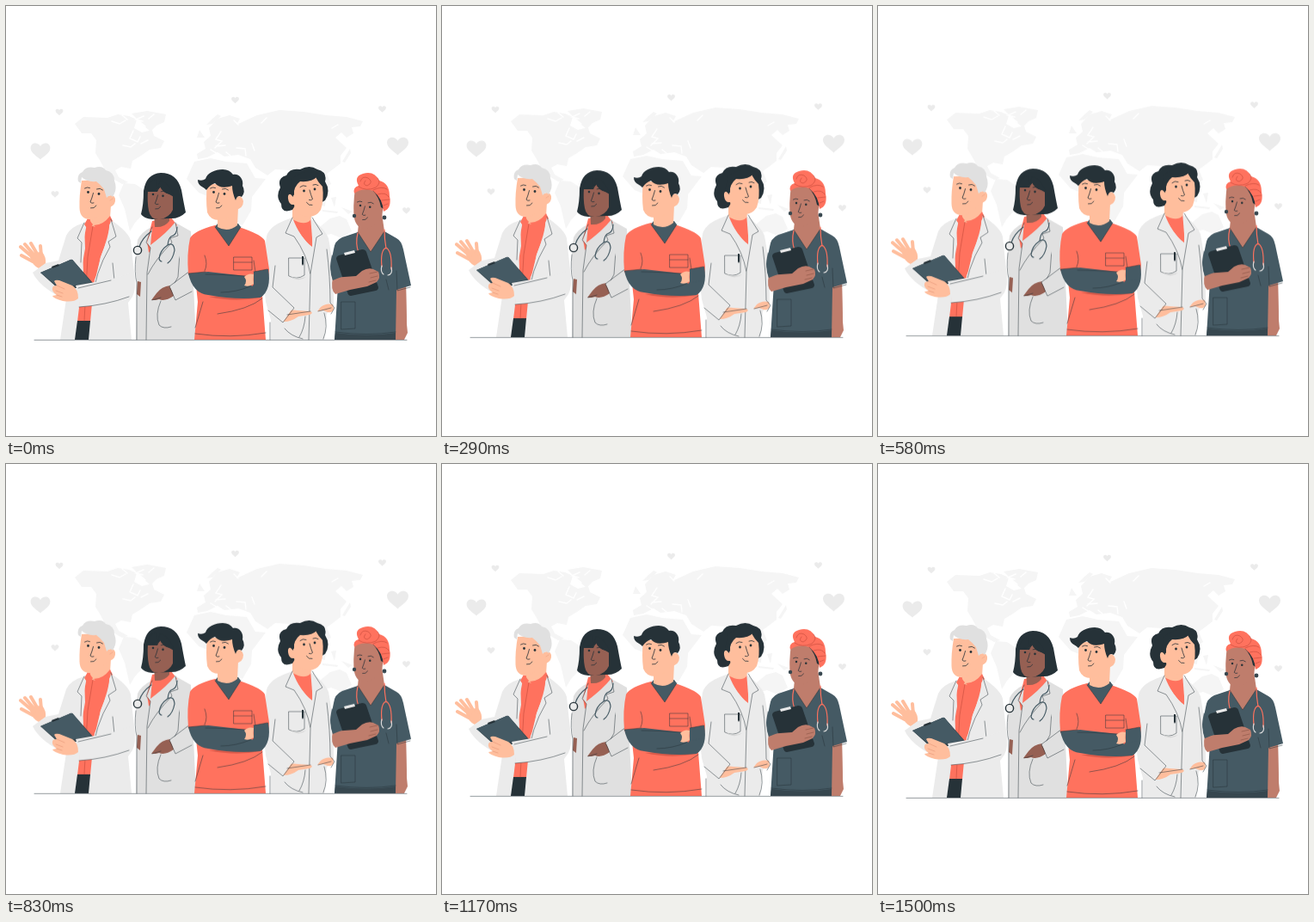
An HTML page that plays this animation: 500x500 px, repeating every 1.54 s.

```html
<!DOCTYPE html>
<html lang="en">
<head>
<meta charset="utf-8">
<title>Medical team</title>
<style>
html, body { margin: 0; width: 100%; height: 100%; overflow: hidden; background: #fff }
svg { display: block; width: 100vw; height: 100vh }
.map { fill: #f5f5f5 }
.heart { fill: #ebebeb }
.coat { fill: #ebebeb }
.coat2 { fill: #e0e0e0 }
.shade { fill: #d6d6d6 }
.grey { fill: #e0e0e0 }
.red { fill: #ff725e }
.deep { fill: #d95a4a }
.dark { fill: #263238 }
.slate { fill: #455a64 }
.navy { fill: #37474f }
.light { fill: #ffbe9d }
.brown { fill: #966053 }
.tan { fill: #bf7d6c }
.ln { fill: none; stroke: #263238; stroke-width: .5; stroke-linecap: round; stroke-linejoin: round }
.tube { fill: none; stroke: #455a64; stroke-width: 1.2; stroke-linecap: round }
.finger { fill: none; stroke: #ffbe9d; stroke-width: 4; stroke-linecap: round; stroke-linejoin: round }
.gap { fill: none; stroke: #fff; stroke-width: 1.4; stroke-linecap: round }
</style>
</head>
<body>
<svg viewBox="0 0 500 500">
<defs>
  <path id="heart" class="heart" d="M0 10C-4 6-12 2-12-4C-12-11-3-12 0-6C3-12 12-11 12-4C12 2 4 6 0 10Z"/>
  <g id="face">
    <circle r="1.4" class="dark"/><circle cx="12.5" cy="2" r="1.4" class="dark"/>
    <path class="ln" style="stroke-width:.8" d="M-4-4.500Q-1-6.500 2-5M10-3.600Q14-5.400 17-2.500M6 1Q4.500 7 2.500 11.500Q4 13.500 6.500 12.500M3 18.500Q7 19.500 9.500 15.500"/>
  </g>
</defs>
<g id="scene">

  <g class="map">
    <path d="M80 137L90 129L118 130L130 126L143 128L152 132L149 142L158 147L170 144L172 151L184 157L180 165L167 167L157 174L147 180L145 189L134 187L127 191L131 199L142 205L135 207L119 198L110 181L104 171L105 156L99 148L88 148Z"/>
    <path d="M146 125L164 122L186 126L184 135L175 139L168 146L160 139Z"/>
    <path d="M137 206L150 207L170 220L165 236L150 252L144 262L138 236L131 220Z"/>
    <path d="M222 172L232 166L230 158L238 151L236 142L246 131L260 127L272 131L268 138L292 127L318 121L346 123L372 127L396 129L415 134L412 140L402 141L404 148L396 153L390 147L383 153L396 165L389 174L389 183L380 190L373 195L378 207L371 211L361 199L348 196L342 207L330 191L313 190L304 197L290 188L284 178L270 173L254 175L246 170L234 176L223 178Z"/>
    <path d="M219 181L238 177L256 181L280 183L290 200L302 201L286 222L285 238L275 255L263 250L257 230L224 217L210 201Z"/>
    <path d="M366 256L377 247L388 244L396 248L402 262L390 270L378 265L366 268Z"/>
    <path d="M222 153L225 144L231 153ZM233 138L240 131L246 126L250 128L240 137ZM391 181L400 166L401 171L394 182ZM362 220L372 223L371 233L363 231ZM368 237L386 239L385 241L368 239ZM378 223L384 222L382 234ZM390 234L403 239L398 242Z"/>
  </g>
  <path class="gap" d="M123 134l9 3l7-4M148 145l-4 9l9 4l3-6M155 134l7 6M135 127l6 5M165 156l-8 4M160 128l-9 4l8 2M172 126l-6 5M136 162l9 2l5-4M250 146l-6 9l7 2l-8 8M265 133l5 5M244 163l11-1M238 167l8 5M256 170l5 4M268 165l10 1l1 8M286 160l3 8M303 130l-6 6M386 138l-7 4M283 186l7 13"/>

  <use href="#heart" transform="translate(40 169) scale(.95)"/>
  <use href="#heart" transform="translate(455.500 163) scale(1.040)"/>
  <use href="#heart" transform="translate(62 123.500) scale(.37)"/>
  <use href="#heart" transform="translate(266.500 109.500) scale(.37)"/>
  <use href="#heart" transform="translate(437.500 120) scale(.37)"/>
  <use href="#heart" transform="translate(57 219) scale(.37)"/>
  <use href="#heart" transform="translate(465.500 238) scale(.37)"/>

  <!-- senior doctor -->
  <g>
    <path class="light" d="M28 292Q35 285 42 286Q47 292 46 300L38 305Q30 301 28 292Z"/>
    <path class="finger" d="M32 293L17 280M33 290L22 277M36 288L29 276M41 291L40 279M31 297L18 290"/>
    <path class="coat" d="M91 252Q74 257 70 267L61 296L46 299L31 310Q38 325 62 338L70 341L63 388H146L142 345L147 338Q152 328 149 310L145 273Q143 263 121 248Z"/>
    <path class="red" d="M95 248L121 246L119 268L110 292L102 325L98 367H83L90 310L89 279Z"/>
    <path class="dark" d="M83 366H98L96 388H80Z"/>
    <path class="light" d="M96 243L122 231L121 247Q110 259 100 256Z"/>
    <path class="red" d="M95 247L101 254L96 261L91 254ZM102 255Q113 255 121 244L124 250L111 263Z"/>
    <path class="ln" style="stroke:#b94335" d="M101 256L95 292L91 366"/>
    <path class="coat" d="M91 252L84 270L89 276L87 310L92 282ZM122 248L127 268L119 274L121 280L103 318L99 348L110 292Q119 270 122 248Z"/>
    <path class="ln" d="M91 252L83 270L88 275L87 298M122 248L128 268L119 274L121 280Q103 310 100 345M124 299L126 319L120 326"/>
    <path class="light" d="M88 203Q85 220 85.500 235Q86 248 98 248Q108 247 114 239L121 234Q128 231 127 224Q125 218 119 221L116 202Z"/>
    <path class="grey" d="M84 204Q82 196 89 193Q93 186 103 188Q112 185 116 191Q126 193 126 203Q130 213 124 222Q121 218 117 223L114 213Q109 207 105 204Q94 205 88 199L87 206Z"/>
    <path class="ln" style="stroke:#e99a7c" d="M121 226l3-2"/>
    <use href="#face" x="95.500" y="216.500"/>
    <path class="navy" d="M40 310L75 295Q77 294 79 297L101 322Q99 325 96 325L66 331Q62 331 60 328Z"/>
    <path class="slate" d="M40 310L75 295Q77 294 79 297L99 321L64 328Q62 328 60 326Z"/>
    <path class="dark" d="M53 303l8-3l1 2l-8 3z"/>
    <path class="coat" d="M81 325L121 318L148 310Q154 334 141 341Q115 348 85 350Q86 337 81 325Z"/>
    <path class="ln" d="M84 328L122 319M85 350Q116 348 143 338"/>
    <path class="light" d="M54 328Q54 325 59 325L56 320Q57 318 62 319L77 325Q84 329 84 340Q79 345 66 343Q55 340 54 337L59 336Q53 332 54 328Z"/>
    <path class="ln" style="stroke:#e08f70" d="M59 325l9 4M58 331l8 3M59 336l6 2"/>
  </g>

  <!-- doctor with stethoscope -->
  <g>
    <path class="coat2" d="M171 256Q157 263 153 272Q149 298 152 320L151 388H221L215 262L192 249Z"/>
    <path class="red" d="M170 250L192 246L199 255L176 272L166 287L164 274Z"/>
    <path class="brown" d="M172 238H190V250Q184 258 173 257Z"/>
    <path class="dark" d="M160 215Q163 195 180 194Q199 194 204 214Q207 231 209 240Q201 248 190 247L170 248Q160 247 157 242Q160 231 160 215Z"/>
    <path class="brown" d="M165 214Q164 228 166 238Q168 249 179 248Q190 246 194 237V220Q184 218 180 210Q178 215 165 214Z"/>
    <path class="dark" d="M163 216Q165 205 174 201L176 214L179 203Q191 206 195 222L190 219Q182 217 179 210L176 216Z"/>
    <use href="#face" transform="translate(171 219) scale(.92)"/>
    <path class="coat2" d="M170 257L164 275L168 281L164 310L184 276L200 266L197 251Q188 263 168 278Z"/>
    <path class="ln" d="M170 257L163 275L168 281L164 310L163 388M197 252L200 267L191 270L193 275Q174 294 165 312M180 343Q173 359 178 371Q183 376 192 373M202 288L200 315L194 326"/>
    <path class="tube" d="M169 262Q158 270 155 280M199 257Q199 266 192 268Q189 270 188 278Q179 284 178 294Q179 297 181 297M188 278Q195 274 196 284Q194 295 188 299"/>
    <circle cx="153" cy="284" r="4.600" fill="#ebebeb" stroke="#263238" stroke-width="1.400"/>
    <path class="brown" d="M153 320L157 321L156 338L152 335ZM191 325Q181 326 175 334L169 342L174 342L178 341Q185 344 195 337Z"/>
    <path class="coat2" d="M200 286L213 286L218 324L197 342Q194 332 190 326L207 315Z"/>
    <path class="ln" d="M214 308L190 326L197 342L216 332M151 292Q149 310 152 322V388M170 342l10-3"/>
  </g>

  <!-- doctor on the right -->
  <g>
    <path class="coat" d="M334 246Q306 254 303 268Q297 304 302 344L308 365V388H370L373 358L381 349Q382 304 375 270Q371 259 355 248Z"/>
    <path class="red" d="M334 245L354 244L357 283Q342 267 332 249Z"/>
    <path class="light" d="M333 230L357 235L354 249Q347 256 333 248Z"/>
    <path class="dark" d="M333 237Q320 242 320 230Q313 222 319 211Q315 200 326 197Q330 188 342 190Q353 184 362 190Q374 193 371 204Q378 215 371 226L364 230L340 226Z"/>
    <path class="light" d="M341 202Q334 210 335 220Q327 216 328 224Q329 232 335 231Q336 241 345 244Q359 248 366 237Q370 225 368 210Q363 205 360 199Q351 203 341 202Z"/>
    <path class="dark" d="M334 222Q334 210 342 204Q356 205 361 199Q364 206 370 209L367 195L348 192L333 200L329 217Z"/>
    <g transform="translate(359 213) scale(-1 1)"><use href="#face"/></g>
    <path class="coat" d="M333 246L326 265L335 268L354 310L358 285L365 268L357 245L356 280Q342 270 333 246Z"/>
    <path class="ln" d="M333 246L325 264L335 268Q350 289 354 312L352 388M356 246L368 265L361 269L358 287L354 311M329 293H347V313Q338 319 329 314ZM324 375Q331 384 345 387M348 361Q347 375 341 385M370 357Q375 373 369 387"/>
    <path class="shade" d="M330 314Q338 319 349 315Q340 322 330 314Z"/>
    <path class="dark" d="M344 291H346V300L345 302L344 300Z"/>
    <path class="light" d="M322 358Q331 352 339 354L354 355Q358 357 353 359L340 361Q332 367 323 367ZM380 347Q372 345 366 350L362 355L369 354L374 356Q380 357 381 352Z"/>
    <path class="coat" d="M303 278L317 294L318 334L334 350L322 368L305 352Q298 338 303 278Z"/>
    <path class="ln" d="M313 302L310 327L335 351L322 368L305 354M373 283Q377 315 377 345L382 351L378 358M307 368V388M327 359L354 355M363 355l15-4"/>
  </g>

  <!-- nurse with crossed arms -->
  <g>
    <path class="red" d="M243 255Q219 261 214 270Q210 288 212 312L221 325L223 344L219 388H302L298 337L304 326L306 306L301 273Q298 266 271 257Z"/>
    <path class="slate" d="M243 257L246 253H270L273 257L259 279Z"/>
    <path class="light" d="M246 236L270 234L269 255Q258 264 246 257Z"/>
    <path class="light" d="M234 207Q232 225 234 240Q238 250 250 249Q261 247 266 237Q276 236 276 227Q274 219 268 222L265 207Z"/>
    <path class="dark" d="M233 214C230 210 223 210 223 202Q228 204 232 201C234 194 243 190 252 190Q260 190 264 196C270 194 277 201 275 209Q279 216 274 222Q269 219 267 226Q263 217 263 209C254 212 247 211 243 206Q237 208 233 214Z"/>
    <use href="#face" x="241.500" y="216.500"/>
    <path class="ln" d="M243 257L259 279L273 257M265 292H286V307H265ZM265 298H286M231 290Q235 300 231 308M288 296L290 309M298 340Q282 353 246 358M220 381Q261 387 302 380M229 344Q224 361 220 374"/>
    <path class="deep" d="M236 338Q268 336 295 339Q267 345 236 338Z"/>
    <path class="slate" d="M212 311L235 309L279 314L286 326L305 306Q309 330 296 339Q267 342 235 336Q217 334 212 311Z"/>
    <path class="slate" d="M288 309L305 306L304 322L288 324Z"/>
    <path class="ln" d="M232 312Q249 312 279 314M250 333Q267 333 284 326M288 309L304 306M212 311L232 309"/>
    <path class="light" d="M277 315Q282 310 288 312Q287 318 288 323Q283 327 277 325Q281 320 277 315Z"/>
  </g>

  <!-- nurse with headwrap -->
  <g>
    <path class="tan" d="M451 322L465 321Q466 351 466 370L467 380L463 388H450Q449 377 453 369Z"/>
    <path class="slate" d="M409 263L391 269Q382 273 381 283L377 303L380 319L386 325L382 388H453L454 330L471 325L462 283Q460 273 454 270L440 262Z"/>
    <path class="tan" d="M411 243L437 241L440 262L424 286L409 263Z"/>
    <path class="tan" d="M406 212Q403 234 405 247Q408 260 420 259Q432 256 437 245L440 225L430 210Z"/>
    <path class="dark" d="M426 211Q437 216 441 237L436 234Q434 222 426 214Z"/>
    <path class="red" d="M405 218Q403 211 410 209Q404 198 415 195Q428 191 434 203Q446 206 446 221Q449 235 439 239Q438 224 427 215Q414 211 405 218Z"/>
    <path class="ln" style="stroke:#b94335" d="M410 210Q419 216 430 211Q437 205 432 200M412 204Q414 197 421 200Q428 205 420 209Q414 208 418 203M427 214Q437 209 443 213M432 219Q442 216 445 222M437 226L446 225M439 232L444 230"/>
    <use href="#face" transform="translate(412 232) scale(.9)"/>
    <circle cx="405" cy="244" r="2.200" class="navy"/><circle cx="440" cy="246" r="2.400" class="navy"/>
    <path class="ln" d="M409 263L424 286L440 262M390 344H406V375L390 376ZM383 379Q420 384 453 379M454 308L455 331L470 327M442 318L445 330"/>
    <path class="navy" d="M383 380Q420 385 453 380V388H382Z"/>
    <path class="tube" style="stroke:#ff725e" d="M409 264Q406 276 410 287M440 260Q440 271 442 282M442 281Q435 284 437 303M442 281Q449 285 448 306"/>
    <path class="tube" style="stroke:#dbdbdb" d="M437 302Q435 309 439 312M448 304Q450 312 444 313"/>
    <path class="dark" d="M384 294Q384 291 387 290L414 283Q418 283 419 286L433 327Q433 330 430 331L401 337Q398 337 397 333Z"/>
    <path fill="#ebebeb" d="M393 287l12-3l1 3l-12 3z"/>
    <path class="tan" d="M380 316L407 314L414 308Q421 304 427 306L433 309Q436 316 431 321L420 326L400 330L383 335Q377 330 380 316Z"/>
    <path class="ln" style="stroke:#7f4a3d" d="M423 311l9-2M424 316l8-2M422 321l8-2"/>
    <path class="slate" d="M379 289L386 303L390 315L380 319Q375 307 379 289Z"/>
  </g>

  <path class="ln" d="M33 388.400H466"/>
</g>
</svg>
<script>
// Rise with an ease-out, sink back with a softer curve.
const lift = 'translateY(-5.3px)', rest = 'translateY(0)';
document.getElementById('scene').animate([
  { transform: rest, easing: 'ease-out' },
  { transform: lift, easing: 'cubic-bezier(.3,.05,.6,1)' },
  { transform: rest }
], { duration: 1540, iterations: Infinity });
</script>
</body>
</html>
```
